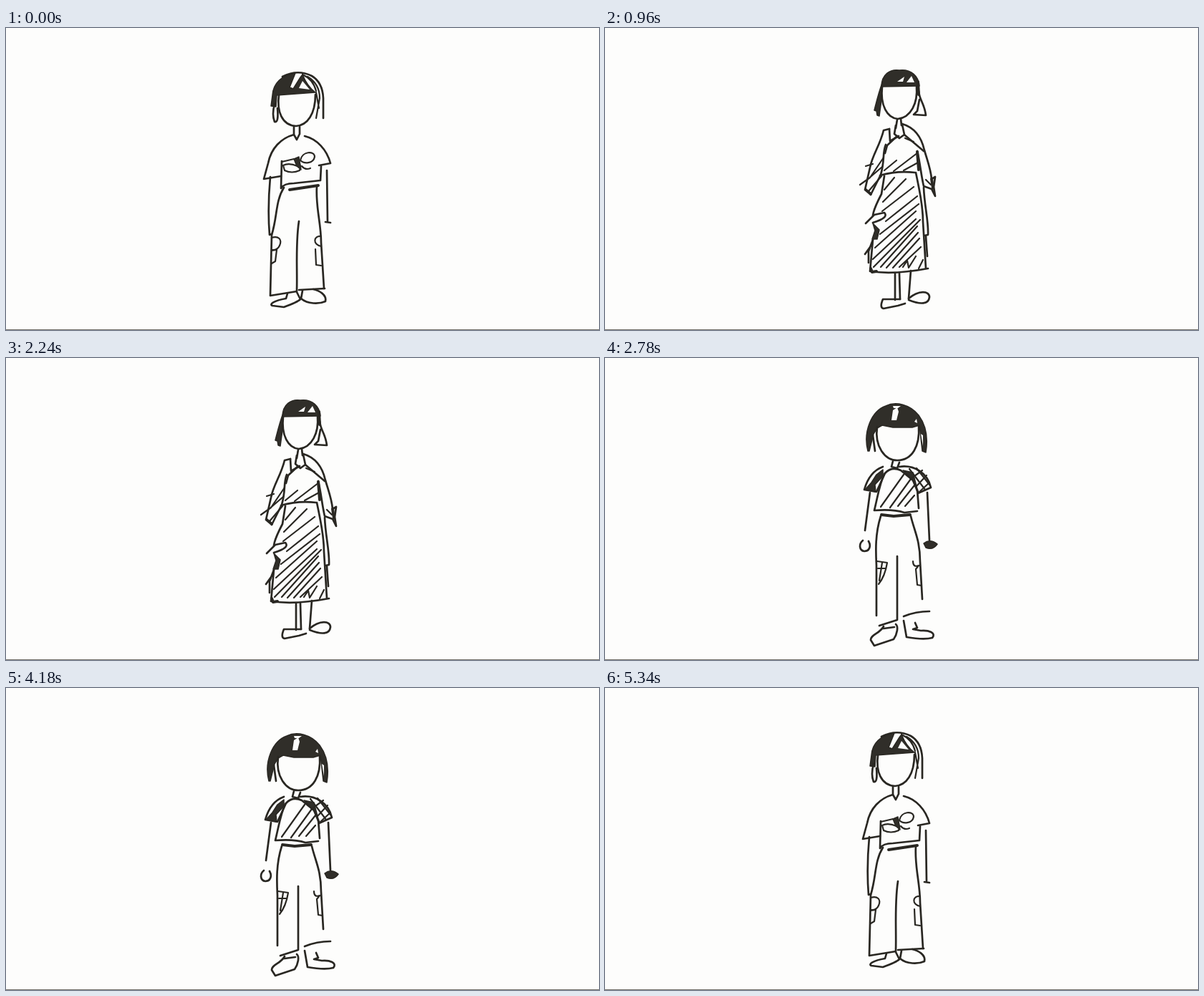
Write an HTML page that moves like this. It is 828 by 422 pixels and loops after 5.36 s.

```html
<!DOCTYPE html>
<html lang="en">
<head>
<meta charset="utf-8">
<title>Outfits</title>
<style>
  html, body { margin: 0; width: 100%; height: 100%; overflow: hidden; background: #fdfdfc; }
  svg { display: block; width: 828px; height: 422px; }
  .figure { fill: none; stroke: #292722; stroke-width: 2.7; stroke-linecap: round; stroke-linejoin: round; filter: blur(.6px); }
  .solid { fill: #302e29; stroke-width: 1.5; }
  .thin { stroke-width: 2.2; }
  .thick { stroke-width: 4; }
  .light { fill: #fdfdfc; stroke: none; }
</style>
</head>
<body>
<svg id="stage" viewBox="0 0 828 422">
  <rect width="828" height="422" fill="#fdfdfc"/>
  <rect y="421" width="828" height="1" fill="#73716a"/>
</svg>
<script>
const NS = 'http://www.w3.org/2000/svg';
const stage = document.getElementById('stage');
const LOOP = 5360;

// Each outfit is a list of [path, style] pairs.
const tee = [
  // hair and face
  ['M372 94 C373 77 385 66 404 63 L396 83 L401 85 L411 69 L414 65 Q421 82 432 90 L378 94 L377 110 L370 109 Z', 'solid'],
  ['M409 84 L414 74 L424 86 Z', 'light'],
  ['M386 68 Q407 57 427 67 Q442 76 443 98 L443 126'],
  ['M414 65 Q429 72 433 88 M421 68 Q438 78 438 98 L433 126 M433 90 L437 112', 'thin'],
  ['M375 106 Q371 121 375 131 Q381 133 379 112'],
  ['M381 94 C378 116 385 136 405 137 C421 136 432 120 432 93'],
  ['M402 138 L402 149 L406 156 L410 148 L410 138'],
  // shirt
  ['M402 149 C384 154 370 168 366 189 L360 211 L384 207 M417 151 C434 155 448 170 453 189 L437 192'],
  ['M385 186 L384 224 Q388 217 402 217 L439 213 L440 193'],
  ['M396 226 L436 220', 'thick'],
  ['M385 187 L402 183 Q414 190 410 199 Q399 204 389 199 L387 192 Q395 188 407 193 M411 185 C413 172 431 171 431 180 C429 190 416 190 411 185 M413 193 Q418 199 425 196', 'thin'],
  ['M402 183 L409 180 L412 198 L406 193 Z', 'solid'],
  // arms
  ['M369 208 Q365 252 368 289 L371 288 M448 199 L449 271 M446 271 L453 272'],
  // trousers
  ['M388 223 C376 242 379 264 371 289 L369 374 L406 368 M434 221 C432 250 440 272 440 300 L444 364'],
  ['M409 270 C404 302 407 338 406 367 M409 366 L445 364'],
  ['M371 293 C380 290 386 295 382 304 Q379 311 371 310 M371 311 L378 310 L376 326 L371 329 M440 291 C429 290 428 303 440 305 M432 309 L433 331 L440 332', 'thin'],
  // shoes
  ['M393 371 L391 378 C374 381 367 386 372 388 L388 390 C399 386 407 383 411 379 L406 369'],
  ['M414 367 L412 378 C421 386 437 386 446 382 C448 373 438 367 429 365']
];

const dress = [
  // hair and face
  ['M386 82 C386 65 398 57 411 59 C428 57 438 68 439 81 Z', 'solid'],
  ['M408 75 L418 68 L416 75 Z M421 76 L428 67 L432 76 Z', 'light'],
  ['M387 77 C382 90 379 103 376 115 L379 116 L380 122 L383 123 L386 101 Z', 'solid'],
  ['M437 75 L438 93', 'thick'],
  ['M438 88 C439 101 446 105 448 122 L431 121 L436 116 L439 100'],
  ['M387 82 C384 108 394 126 409 127 C427 125 437 105 435 82'],
  // collar and bodice
  ['M408 128 L406 140 M413 127 L414 136 M397 141 L398 158 L410 151 M406 136 L404 148 L411 154 L418 149 L415 135'],
  ['M397 141 L389 143 C384 164 373 178 370 195 L363 226 M392 163 C387 175 391 185 385 205 L371 233'],
  ['M415 134 C432 139 442 153 446 171 C451 188 455 198 456 211 L461 208 L459 222 L461 235 L456 225 L445 221 C441 204 440 188 436 172'],
  ['M408 151 L394 164 L391 175 M419 150 L445 172 M384 206 Q408 199 433 202'],
  ['M436 173 L438 198 M456 211 L458 224 M364 226 L371 232', 'thick'],
  ['M356 219 L370 209 L389 181 M364 193 L374 190 M365 213 L387 194 M368 228 L386 207 M390 199 L407 185 M403 200 L437 174 M417 199 L437 188 M419 154 L431 159 M448 212 L455 219', 'thin'],
  // skirt
  ['M390 207 L386 232 Q375 253 374 262 M374 296 L370 340 Q404 345 451 336 M434 202 C439 226 444 250 444 271 L448 336'],
  ['M445 223 C446 249 452 270 451 289 L446 290 M448 291 L450 319 M374 296 L368 312 L368 328 M363 316 L373 302'],
  ['M364 273 L376 261 L390 258 Q397 265 374 272'],
  ['M374 273 L383 282 L380 295 L373 295 L377 283 Z', 'solid'],
  ['M371 336 L373 341 L379 340', 'thick'],
  ['M390 226 L404 209 M388 243 L420 211 M387 256 L431 222 M392 270 L436 235 M384 288 L438 246 M377 307 L434 256 M374 323 L434 267 M375 334 L440 268 M385 334 L436 277 M393 335 L437 286 M402 335 L439 294 M411 334 L441 306 M416 334 L422 325 L424 335 L434 319 M438 336 L444 324', 'thin'],
  // legs and shoes
  ['M405 343 L405 380 M411 343 L412 379 M427 339 L424 378'],
  ['M412 379 L388 379 Q383 391 389 392 L409 388 L419 385'],
  ['M424 378 C438 366 453 367 453 376 C452 386 441 387 424 380']
];

const sporty = [
  // hair and face
  ['M367 130 C360 103 372 74 392 67 C406 60 426 65 438 80 C449 95 451 114 448 132 L443 130 L439 94 L429 97 L402 97 L387 94 L380 98 L375 106 L369 130 Z', 'solid'],
  ['M400 87 L402 73 L408 69 L410 75 L407 87 Z M402 67 L413 67 L409 70 L403 70 Z M432 89 L435 85 L436 91 Z M441 106 L444 108 L444 123 Z', 'light'],
  ['M374 108 L377 130'],
  ['M380 96 C376 124 391 143 408 143 C429 143 440 123 438 95'],
  ['M402 144 L400 152 L408 154 L411 146'],
  // shirt
  ['M388 152 C374 157 366 170 362 184 L379 187 L391 161 Q400 151 413 157 L430 171 L437 188'],
  ['M411 152 C431 149 450 160 455 181 L437 189'],
  ['M363 184 L372 174 L379 163 L388 156 L388 165 L377 177 L378 187 Z', 'solid'],
  ['M416 157 L430 160 L437 187 L430 171 Z', 'solid'],
  ['M425 155 L447 184 M435 154 L453 177 M428 168 L443 157 M434 180 L449 164 M439 187 L453 174', 'thin'],
  ['M390 162 C383 177 381 193 376 213 Q403 211 418 216 L436 214 M436 184 L438 210'],
  ['M385 208 L417 163 M398 209 L427 169 M409 207 L432 178 M419 207 L432 192', 'thin'],
  ['M386 219 L403 221 L426 219', 'thick'],
  // arms
  ['M370 188 L363 241 M360 255 C354 260 355 269 362 270 C369 270 372 263 368 256 M450 188 L453 255'],
  ['M445 259 Q454 252 464 260 Q458 269 448 265 Z', 'solid'],
  // trousers
  ['M385 221 C377 246 378 270 379 290 L379 360 M427 221 C432 242 440 255 440 285 L443 337'],
  ['M408 277 L408 366 L383 374 M417 361 Q434 354 453 354'],
  ['M380 284 L394 286 Q391 305 382 316 M381 294 L391 294 M387 286 L383 311 M430 284 Q430 293 438 290 L434 295 L436 317 L442 318', 'thin'],
  // shoes
  ['M389 375 C383 386 371 386 371 394 L376 402 L403 393 C408 386 410 375 406 372 M389 378 L404 376'],
  ['M417 367 L421 390 Q445 394 457 391 C463 384 452 380 441 381 L430 379 L436 377 L433 370']
];

function make(tag, attributes, parent) {
  const node = document.createElementNS(NS, tag);
  for (const key in attributes) node.setAttribute(key, attributes[key]);
  return parent.appendChild(node);
}

function drawFigure(parts) {
  const group = make('g', { class: 'figure' }, stage);
  for (const [d, style = 'line'] of parts) make('path', { d, class: style }, group);
  return group;
}

const figures = [tee, sporty, dress].map(drawFigure);
const cuts = [140, 580, 1020, 1460, 1900, 2360, 2780, 3220, 3660, 4080, 4500, 4940];

function render(time) {
  const t = time % LOOP;
  const current = cuts.filter(cut => t >= cut).length % figures.length;
  figures.forEach((figure, i) => figure.style.display = i === current ? '' : 'none');
}

const start = performance.now();
function tick() {
  render(performance.now() - start);
  requestAnimationFrame(tick);
}
render(0);
requestAnimationFrame(tick);
</script>
</body>
</html>
```
